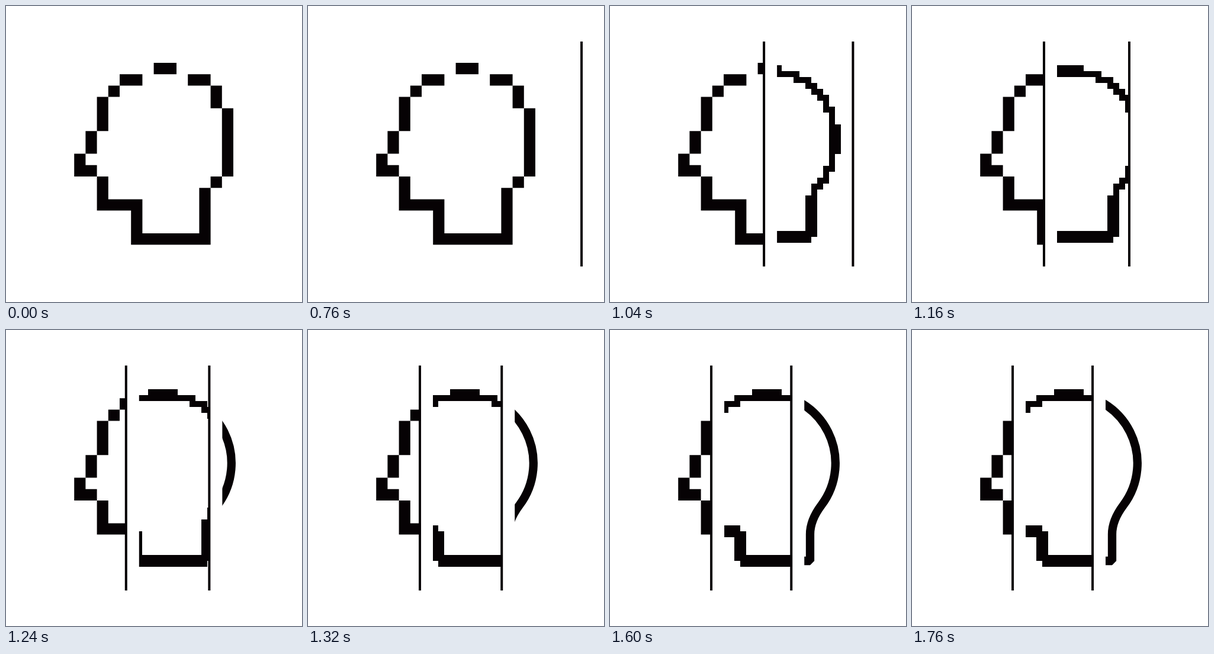
Animation of 500x500 px, one loop 5000 ms. Source, as an HTML page:

```html
<!DOCTYPE html>
<html lang="en">
<head>
<meta charset="utf-8">
<title>Head in three resolutions</title>
<style>
  html, body { margin: 0; width: 100%; height: 100%; overflow: hidden; background: #fff; }
  svg { display: block; width: 100%; height: 100%; }
</style>
</head>
<body>
<svg viewBox="0 0 500 500">
  <defs>
    <clipPath id="clipLeft"><rect height="500"/></clipPath>
    <clipPath id="clipMid"><rect height="500"/></clipPath>
    <clipPath id="clipRight"><rect height="500"/></clipPath>
  </defs>
  <g fill="#060204">
    <g clip-path="url(#clipLeft)"><path id="coarse"/></g>
    <g clip-path="url(#clipMid)"><path id="fine"/></g>
    <g clip-path="url(#clipRight)">
      <path fill="none" stroke="#060204" stroke-width="14.3" stroke-linejoin="bevel"
        d="M262.5 107.2A117.8 117.8 0 0 1 357 296C345 312 338 328 338 345V390H262"/>
    </g>
    <rect id="lineA" y="60" width="4" height="380"/>
    <rect id="lineB" y="60" width="4" height="380"/>
  </g>
</svg>
<script>
const LOOP = 5000, STEP = 40, START = 760, GAP = 22;
const END_A = 170, END_B = 305, RATIO_B = 1.17;

// Each block is "x y width height" in cells.
const coarse = `13 5 2 1, 10 6 2 1, 16 6 2 1, 9 7 1 1, 18 7 1 2, 8 8 1 3, 19 9 1 6,
  7 11 1 2, 6 13 1 2, 7 14 1 1, 8 15 1 3, 18 15 1 1, 17 16 1 5, 8 17 4 1, 11 17 1 4, 11 20 7 1`;
const fine = `24 10 5 1, 21 11 11 1, 21 11 1 2, 19 12 3 1, 19 12 1 2, 31 11 1 2, 31 12 3 1,
  33 13 2 1, 34 14 2 1, 35 15 2 1, 36 15 1 3, 37 17 1 11, 38 20 1 5, 36 27 1 3, 35 29 1 2,
  34 30 1 2, 33 32 2 7, 22 38 12 2, 21 34 2 5, 19 33 3 2`;

// Time and fourth root of the distance left to travel
const glide = [[760, 4.134], [920, 3.464], [1160, 2.698], [1320, 2.088], [1440, 1.627], [1760, 0.4]];

const el = id => document.getElementById(id);
const clipRect = id => el(id).firstElementChild;
const clips = ["clipLeft", "clipMid", "clipRight"].map(clipRect);
const lineA = el("lineA"), lineB = el("lineB");

function blocks(text, cell) {
  return text.split(",").map(item => {
    const [x, y, w, h] = item.trim().split(" ").map(n => +(n * cell).toFixed(2));
    return `M${x} ${y}h${w}v${h}h${-w}z`;
  }).join("");
}

function distance(t) {
  if (t < START) return 400;
  let root = glide[glide.length - 1][1];
  for (let i = 1; i < glide.length; i++) {
    const [t0, r0] = glide[i - 1], [t1, r1] = glide[i];
    if (t < t1) {
      root = r0 + (r1 - r0) * (t - t0) / (t1 - t0);
      break;
    }
  }
  return root ** 4;
}

function setSpan(rect, from, to) {
  rect.setAttribute("x", from);
  rect.setAttribute("width", Math.max(0, to - from));
}

function draw(t) {
  const d = distance(t);
  const a = END_A + d, b = END_B + d * RATIO_B;
  setSpan(clips[0], 0, a);
  setSpan(clips[1], a + GAP, b);
  setSpan(clips[2], b + GAP, 500);
  lineA.setAttribute("x", a - 2);
  lineB.setAttribute("x", b - 2);
}

el("coarse").setAttribute("d", blocks(coarse, 19.2));
el("fine").setAttribute("d", blocks(fine, 10));

const origin = performance.now();
function tick() {
  const t = (performance.now() - origin) % LOOP;
  draw(Math.floor(t / STEP) * STEP);
  requestAnimationFrame(tick);
}
tick();
</script>
</body>
</html>
```
